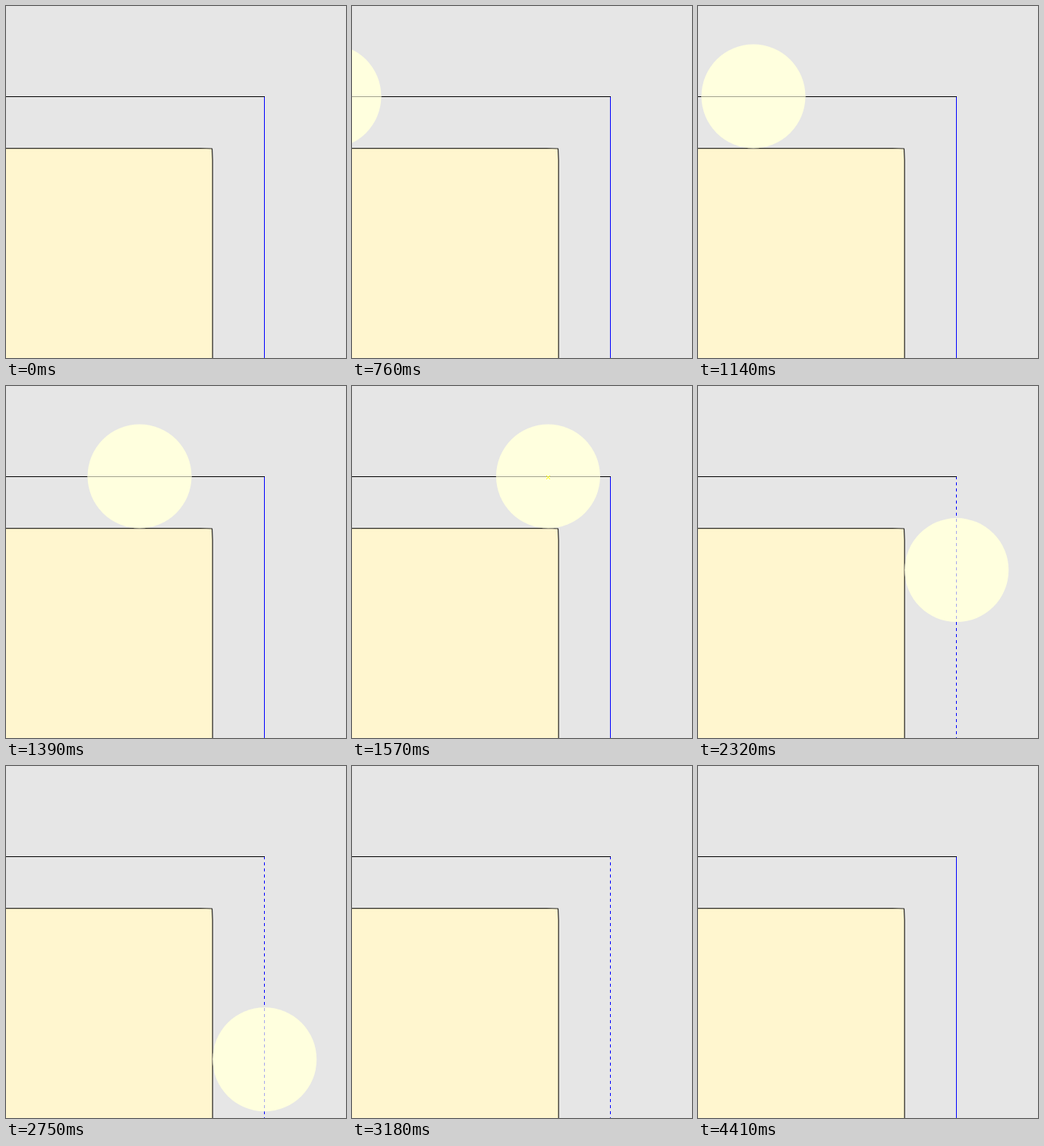
Animation, 448 px wide and 464 px high, one loop 4610 ms. Source, as an HTML page with a canvas:

```html
<!DOCTYPE html>
<html lang="en">
<head>
<meta charset="utf-8">
<title>Circle following an offset path</title>
<style>
  html, body { margin: 0; width: 100%; height: 100%; overflow: hidden; background: #e6e6e6; }
  canvas { display: block; }
</style>
</head>
<body>
<canvas id="stage" width="448" height="464"></canvas>
<script>
const ctx = document.getElementById('stage').getContext('2d');
const LOOP = 4610, START = 760, DASH_ON = 1880, DASH_OFF = 4410;
const CORNER = { x: 340.8, y: 119 };
const RADIUS = 68.5, STEP = 20.6, FIRST = -18;

// Pauses between equal steps along the path; step 0 is the corner.
const PAUSES = [
  60, 100, 60, 60, 100, 60, 30, 30, 30,
  60, 60, 60, 40, 60, 60, 60, 100, 30,
  180, 60, 70, 60, 60, 70,
  60, 60, 60, 60, 60, 60, 70, 60, 30,
  100, 30, 60, 60, 60, 30
];

function stepAt(time) {
  if (time < START) return null;
  let end = START;
  for (let i = 0; i < PAUSES.length; i++) {
    end += PAUSES[i];
    if (time < end) return FIRST + i;
  }
  return null;
}

function line(x1, y1, x2, y2, color) {
  ctx.strokeStyle = color;
  ctx.lineWidth = 1;
  ctx.beginPath();
  ctx.moveTo(x1, y1);
  ctx.lineTo(x2, y2);
  ctx.stroke();
}

function drawPath(top, side, dashed) {
  ctx.setLineDash(dashed ? [4, 4] : []);
  line(340.5, 119, 340.5, 464, side);
  ctx.setLineDash([]);
  line(0, 119.5, 341, 119.5, top);
}

function drawSheet() {
  ctx.beginPath();
  ctx.moveTo(-5, 187.5);
  ctx.lineTo(256, 187.5);
  ctx.lineTo(271.5, 188);
  ctx.lineTo(272.2, 203);
  ctx.lineTo(272.2, 470);
  ctx.lineTo(-5, 470);
  ctx.closePath();
  ctx.fillStyle = '#fff6cf';
  ctx.fill();
  ctx.strokeStyle = '#2b2b28';
  ctx.lineWidth = 1.25;
  ctx.lineJoin = 'round';
  ctx.stroke();
}

function drawCross(x, y, color) {
  ctx.fillStyle = color;
  for (let d = -2; d <= 2; d++) {
    ctx.fillRect(x + d, y + d, 1, 1);
    ctx.fillRect(x + d, y - d, 1, 1);
  }
}

function drawCircle(step, dashed) {
  const x = CORNER.x + STEP * Math.min(step, 0);
  const y = CORNER.y + STEP * Math.max(step, 0);
  ctx.save();
  ctx.beginPath();
  ctx.arc(x, y, RADIUS, 0, Math.PI * 2);
  ctx.fillStyle = '#ffffde';
  ctx.fill();
  ctx.clip();
  drawPath('#a3a38e', '#a6a6ee', dashed);
  if (step >= -4 && step <= 0) drawCross(Math.floor(x), 120, '#ffff00');
  ctx.restore();
}

function draw(time) {
  const dashed = time >= DASH_ON && time < DASH_OFF;
  const step = stepAt(time);
  ctx.fillStyle = '#e6e6e6';
  ctx.fillRect(0, 0, 448, 464);
  drawSheet();
  drawPath('#000', '#00f', dashed);
  if (step !== null) drawCircle(step, dashed);
}

const begin = performance.now();
function tick() {
  draw((performance.now() - begin) % LOOP);
  requestAnimationFrame(tick);
}
tick();
</script>
</body>
</html>
```
